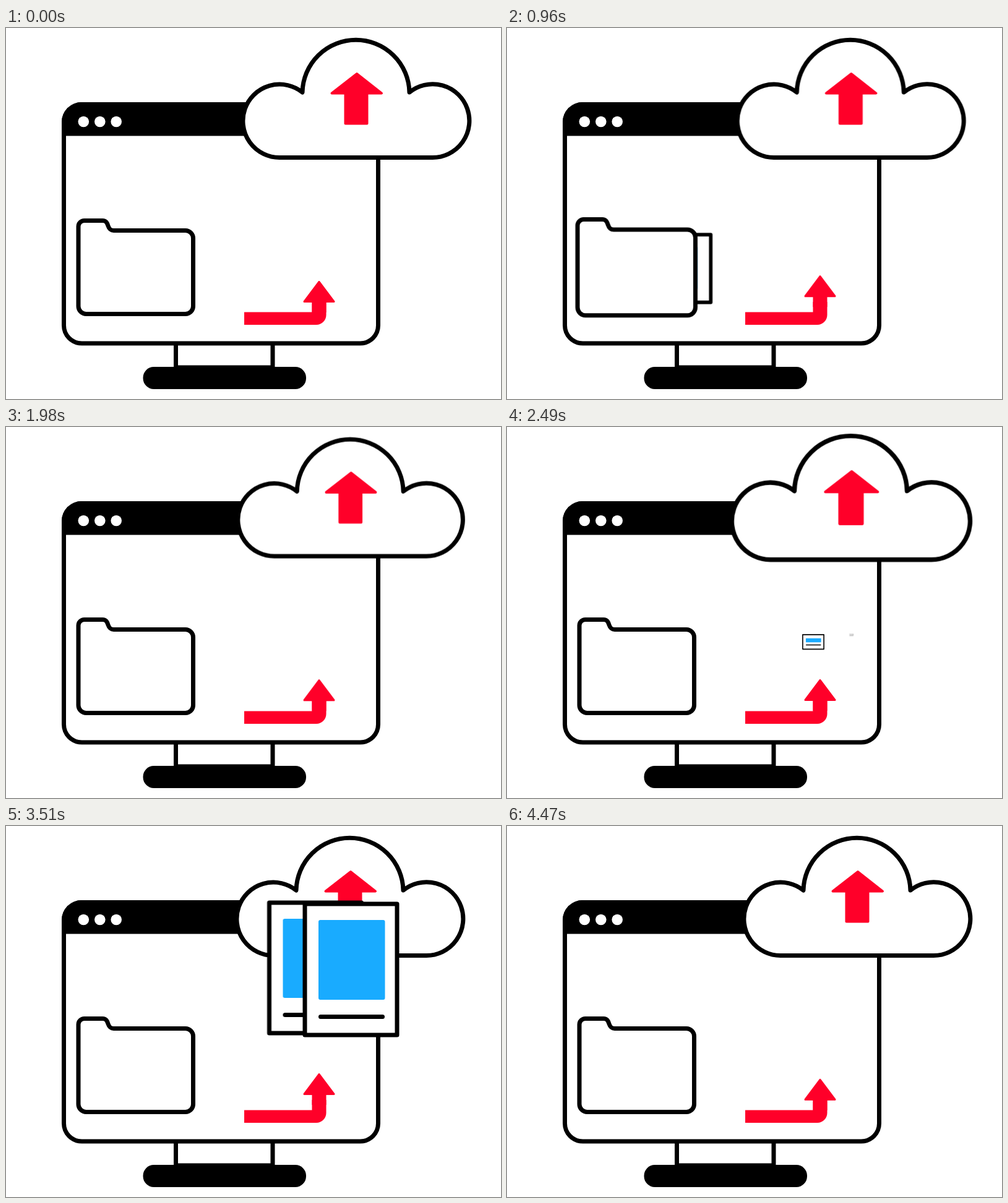
Recreate the animation shown at these times as an HTML page. Size 800 by 600 pixels, loop 4500 ms.

```html
<!DOCTYPE html>
<html lang="en">
<head>
<meta charset="utf-8">
<title>Cloud upload</title>
<style>
@property --h { syntax: "<number>"; inherits: true; initial-value: 212; }

:root {
  --loop: 4.5s;
  --sine: cubic-bezier(.37, 0, .63, 1);
}
html, body { margin: 0; width: 100%; height: 100%; overflow: hidden; background: #fff; }
svg { display: block; width: 100%; height: 100%; }

.line { fill: #fff; stroke: #000; stroke-width: 7; stroke-linejoin: round; stroke-linecap: round; }
.red { fill: #ff0029; }
.soft { stroke: #ff0029; stroke-linejoin: round; }
.blue { fill: #19abff; }
.dot { fill: #fff; transform-box: fill-box; transform-origin: center; }

.dot, .folder, .fly, .pulse, .page { animation: var(--loop) var(--sine) infinite; }

/* Title bar dots blink one after another */
.dot { animation-name: blink; }
.dot:nth-of-type(2) { animation-delay: 60ms; }
.dot:nth-of-type(3) { animation-delay: 150ms; }
@keyframes blink {
  0%, 60%, 70.4%, 100% { transform: none; }
  65.3% { transform: scale(.77); }
}

.folder { animation-name: squeeze; transform-origin: 231px 381px; vector-effect: non-scaling-stroke; }
@keyframes squeeze {
  0%, 8%, 25.3%, 100% { transform: scale(1); }
  12% { transform: scale(.803, .828); }
  16.7% { transform: scale(1.062); }
}

.head { animation: bob calc(var(--loop) / 7) var(--sine) infinite; }
@keyframes bob {
  44% { transform: translateY(-9px); }
}

/* One sheet slides out of the folder, turns and rises into the cloud */
.fly { animation-name: send, turn, show; }
@keyframes send {
  0%, 18.7% { translate: 209px 388px; scale: .8; }
  29.3%, 34.5% { translate: 558px 394.5px; scale: 1; }
  43.3%, 100% { translate: 555px 132px; scale: .65; }
}
@keyframes turn {
  0%, 31.5% { rotate: 90deg; }
  39.5%, 100% { rotate: 0deg; }
}
@keyframes show {
  0%, 18.69%, 43.4%, 100% { opacity: 0; }
  18.7%, 43.3% { opacity: 1; }
}

.sway { animation: sway calc(var(--loop) / 6) var(--sine) infinite alternate; }
@keyframes sway {
  to { transform: translateX(-13px); }
}
.pulse { animation-name: pulse; transform-origin: 566px 114.5px; }
@keyframes pulse {
  0%, 43.56%, 62%, 100% { transform: none; }
  47.3% { transform: scale(.82); }
  52% { transform: scale(1.07); }
}

/* Sheets stand on their bottom edge and change height */
.page { transform-origin: 74.5px 0; }
.page .frame { y: calc(var(--h) * -1px); height: calc(var(--h) * 1px); }
.page .blue { y: calc((26 - var(--h)) * 1px); height: calc(max(0, var(--h) * .924 - 67) * 1px); }
.back { animation-name: back; }
.front { animation-name: front; }
@keyframes back {
  0%, 52% { --h: 70; transform: translate(419px, 366.5px) scale(0); }
  62.5%, 84% { --h: 211; transform: translate(425.5px, 335px) scale(1); animation-timing-function: linear; }
  88.667% { --h: 147; transform: translate(419px, 366.5px) scale(1); animation-timing-function: linear; }
  92%, 100% { --h: 90; transform: translate(415px, 388px) scale(0); }
}
@keyframes front {
  0%, 54% { --h: 70; transform: translate(482px, 337.5px) scale(0); }
  64.5%, 86.5% { --h: 212; transform: translate(483px, 338px) scale(1); animation-timing-function: linear; }
  88.667% { --h: 199; transform: translate(482px, 337.5px) scale(1); animation-timing-function: linear; }
  95.5%, 100% { --h: 80; transform: translate(482px, 337.5px) scale(0); }
}
</style>
</head>
<body>
<svg viewBox="0 0 800 600">
  <!-- monitor -->
  <rect class="line" x="274.5" y="508" width="156.5" height="41"/>
  <rect x="221.5" y="548" width="263.5" height="36" rx="17.5"/>
  <rect class="line" x="93.5" y="123.5" width="508" height="386.5" rx="29"/>
  <path d="M90 174.5V152a32 32 0 0 1 32-32H573a32 32 0 0 1 32 32V174.5Z"/>
  <g>
    <circle class="dot" cx="125.3" cy="151.5" r="8.8"/>
    <circle class="dot" cx="151.8" cy="151.5" r="8.8"/>
    <circle class="dot" cx="178.2" cy="151.5" r="8.8"/>
  </g>

  <!-- bent arrow -->
  <path class="red" d="M385 459.5H494.5V443H517.5V464a16 16 0 0 1-16 16H385Z"/>
  <g class="head">
    <path class="red soft" stroke-width="3" d="M506 410.5L530 442.5H482Z"/>
    <path class="red" d="M494.5 440h23v20h-23Z"/>
  </g>

  <g class="fly">
    <rect class="line" x="-66" y="-84" width="132" height="168"/>
    <rect class="blue" x="-43.5" y="-58" width="85" height="97" rx="3"/>
    <path class="line" d="M-15 61h60"/>
  </g>

  <path class="line folder" d="M126.5 311.5H156c6 0 7.5 4 9 8.500s3.500 7.500 9 7.500H290a12.500 12.500 0 0 1 12.500 12.500V450a12.500 12.500 0 0 1-12.500 12.500H129.500a12.500 12.500 0 0 1-12.500-12.500V321a9.500 9.500 0 0 1 9.500-9.500Z"/>

  <!-- cloud -->
  <g class="sway"><g class="pulse">
    <path class="line" d="M442 209.5A59.2 59.2 0 1 1 479 104A86.52 86.52 0 0 1 652 104A59.4 59.4 0 1 1 689.5 209.5Z"/>
    <path class="red soft" stroke-width="4" d="M567 74L607 105.500H583.500V154.500H548.500V105.500H526.500Z"/>
  </g></g>

  <g class="page back">
    <rect class="line frame" width="149"/>
    <rect class="blue" x="22" width="107.5" rx="3"/>
    <path class="line" d="M25.5-29.500h100"/>
  </g>
  <g class="page front">
    <rect class="line frame" width="149"/>
    <rect class="blue" x="22" width="107.5" rx="3"/>
    <path class="line" d="M25.5-29.500h100"/>
  </g>
</svg>
</body>
</html>
```
